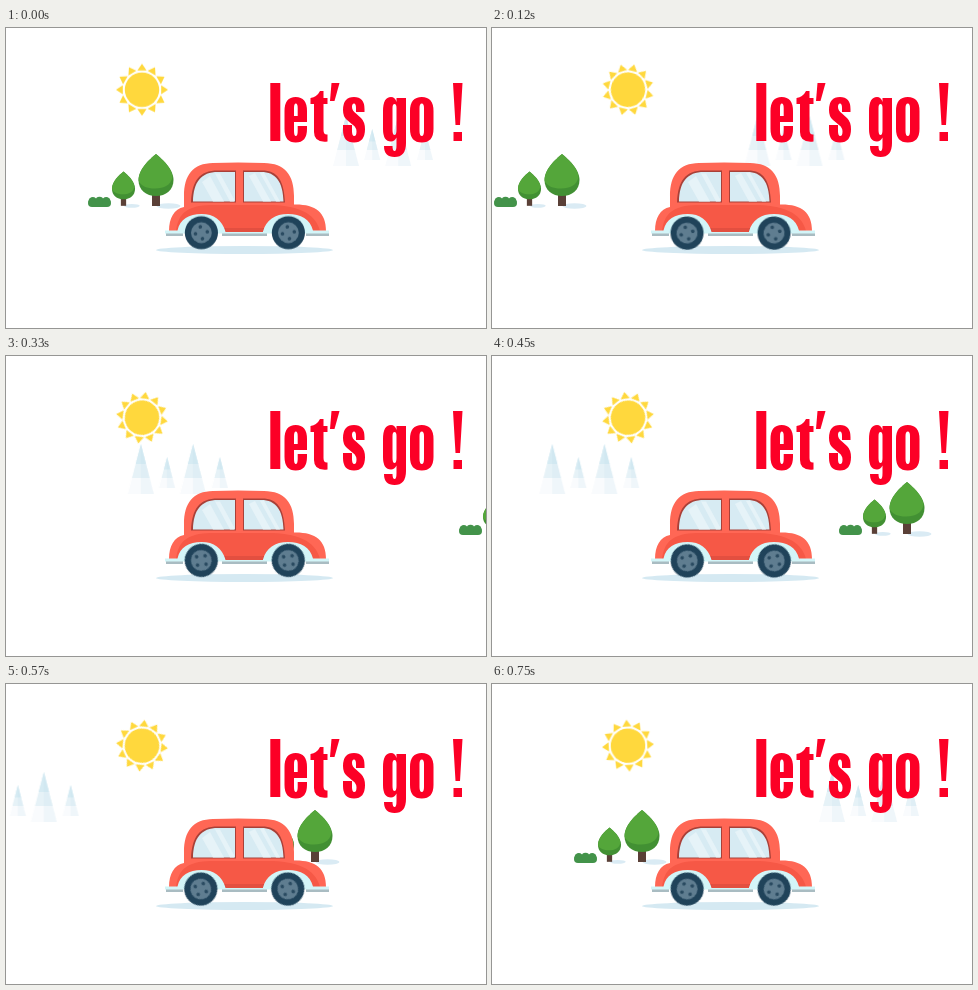
Animation, 480 px wide and 300 px high, one loop 0.78 s. Source, as an HTML page:

```html
<!DOCTYPE html>
<html lang="en">
<head>
<meta charset="utf-8">
<title>Road trip</title>
<style>
  html, body { margin: 0; width: 100%; height: 100%; overflow: hidden; background: #fff; }
  svg { display: block; width: 480px; height: 300px; }
</style>
</head>
<body>
<svg viewBox="0 0 480 300">
  <defs>
    <g id="peak">
      <path d="M0 0L13 50H-13Z" fill="#f9fbfd"/>
      <path d="M0 0L8.8 34H-8.8Z" fill="#e6f2f7"/>
      <path d="M0 0L5.2 20H-5.2Z" fill="#d6ebf3"/>
      <path d="M0 0L13 50H0Z" fill="#b4d6e4" opacity=".13"/>
    </g>
    <g id="tree">
      <ellipse cx="12.5" cy="52" rx="12" ry="2.8" fill="#daebf4"/>
      <path d="M-4 38H4V52H-4Z" fill="#5a4037"/>
      <path d="M0 0C6 5 17.5 15 17.5 26C17.5 36 10 42 0 42C-10 42 -17.5 36 -17.5 26C-17.5 15 -6 5 0 0Z" fill="#429033"/>
      <path d="M0 0C6 5 16 14 16.5 23C15 31 8 34.5 -1 34.5C-9 34.5 -15 32 -17.4 27C-18 15 -6 5 0 0Z" fill="#54a63a"/>
    </g>
    <g id="wheel">
      <circle cx=".4" r="16.6" fill="#20435a"/>
      <circle cx=".4" r="10.4" fill="#5f7d90"/>
      <g id="bolts" fill="#294a60"></g>
    </g>
  </defs>

  <g id="peaks">
    <use href="#peak" x="340" y="88"/>
    <use href="#peak" transform="translate(366.2 101) scale(.62)"/>
    <use href="#peak" x="392.2" y="88"/>
    <use href="#peak" transform="translate(419 101) scale(.62)"/>
  </g>

  <g transform="translate(136 61.7)">
    <g id="sun" fill="#ffd83d"><circle r="17.2"/></g>
  </g>

  <g id="trees">
    <g fill="#43934a">
      <rect x="82" y="171" width="23" height="8" rx="4"/>
      <circle cx="86.800" cy="173.200" r="4.200"/>
      <circle cx="93.500" cy="172.700" r="4"/>
      <circle cx="100.200" cy="173.200" r="4.200"/>
    </g>
    <use href="#tree" transform="translate(117.500 143.500) scale(.66)"/>
    <use href="#tree" x="150" y="126"/>
  </g>

  <ellipse cx="238.500" cy="222" rx="88.500" ry="4" fill="#d5e9f2"/>
  <g id="car">
    <path d="M178 179V168C178 147 187 135.300 207 135Q232 134 258 135C279 135.300 288 147 288 168V176.500C309 176 320 184 320 203H163C163 190 168 181 178 179Z" fill="#ff6755"/>
    <path d="M170 203C172 185 182 177.500 204 177H262C290 177 309 184 314 203Z" fill="#f65846"/>
    <path d="M214 200H265V204H214Z" fill="#d8483b"/>
    <path d="M185 174.500C186 153 193 142.500 212 142.500H230V174.500ZM237 174.500V142.500H256C272 142.500 278 153 279 174.500Z" fill="#a94038"/>
    <path d="M187 173.500C187.500 154 195 144 212 144H229V173.500ZM238 173.500V144H255C270 144 277 154 277.500 173.500Z" fill="#d7ebf3"/>
    <path d="M196 154L204 148L218 173.500H207ZM209 145.500H214L228 171V173.500H224ZM243 148L249 145L265 173.500H257ZM254 145L258 144.500L274 173.500H270Z" fill="#e6f3f8"/>
    <path d="M159 202.500H171.500C174 191 183 186 195.500 186C208 186 216 192 219.500 203.500H257C260 192 269 186 282 186C295 186 304 191 307 202.500H323V205.500H159Z" fill="#d3f5f8"/>
    <path d="M219.500 200H257V204H219.500Z" fill="#e34f40"/>
    <path d="M160 205H177V208H160ZM216 205H261V208H216ZM300 205H323V208H300Z" fill="#a9bcc2"/>
    <path d="M160 204H177V205.500H160ZM216 204H261V205.500H216ZM300 204H323V205.500H300Z" fill="#d3f5f8"/>
  </g>
  <g transform="translate(195 204.700)"><g class="spin"><use href="#wheel"/></g></g>
  <g transform="translate(282 204.700)"><g class="spin"><use href="#wheel"/></g></g>

  <!-- Condensed poster lettering -->
  <g role="img" aria-label="let's go !" fill="#fc0026" fill-rule="evenodd">
    <path d="M264.300 55H274.300V113H264.300Z"/>
    <path d="M278.500 83Q278.500 69 289.700 69Q301 69 301 83V94H288V103Q288 108 289.800 108Q291.700 108 291.700 103V98H301V101Q301 114.500 289.700 114.500Q278.500 114.500 278.500 101ZM288 88H291.700V80Q291.700 75.500 289.800 75.500Q288 75.500 288 80Z"/>
    <path d="M317.500 63V70H321.500V76H317.500V102Q317.500 107 321.500 106.500V113.500Q308 115 308 104V76H304.500V70Q311 69 314 63Z"/>
    <path d="M325.500 55H333.500L328.500 73H324Z"/>
    <path d="M358.500 84H350V80Q350 75.500 348 75.500Q346 75.500 346 79Q346 82.500 350 85.500L355 90Q359 94 359 101Q359 114.500 348 114.500Q337 114.500 337 102V97H346V103Q346 108 348.200 108Q350.500 108 350.500 103.500Q350.500 99.500 347 97L341 92Q337 89 337 82Q337 69 348 69Q358.500 69 358.500 81Z"/>
    <path d="M390.500 70H400V115Q400 129 388.500 129Q378 129 378 118H386.500Q386.500 123 388.600 123Q390.500 123 390.500 117V109.500Q388.500 113.500 385 113.500Q377 113.500 377 101V83Q377 69 385 69Q389 69 390.500 74ZM386.500 80V102Q386.500 107 388.500 107Q390.500 107 390.500 102V80Q390.500 76 388.500 76Q386.500 76 386.500 80Z"/>
    <path d="M404 83Q404 69 415.800 69Q427.500 69 427.500 83V101Q427.500 114.500 415.800 114.500Q404 114.500 404 101ZM413.500 80V103Q413.500 108 415.800 108Q418 108 418 103V80Q418 75.500 415.800 75.500Q413.500 75.500 413.500 80Z"/>
    <path d="M447 55H456.500L454 97H449.500ZM447.500 104H456V113H447.500Z"/>
  </g>
</svg>
<script>
  const LOOP = 780, STEPS = 26;
  const $ = id => document.getElementById(id);

  function add(parent, tag, attrs) {
    const el = document.createElementNS(parent.namespaceURI, tag);
    for (const key in attrs) el.setAttribute(key, attrs[key]);
    parent.append(el);
  }

  for (let i = 0; i < 12; i++)
    add($('sun'), 'path', { d: 'M0 -26L4.6 -19.2H-4.6Z', transform: `rotate(${i * 30})` });
  for (let i = 0; i < 4; i++)
    add($('bolts'), 'circle', { cx: .4, cy: -6, r: 1.8, transform: `rotate(${i * 90 - 10} .4 0)` });

  // Keys are [step, transform]; the whole loop advances in equal ticks.
  function play(el, keys) {
    const frames = keys.map(([step, transform]) => ({ offset: step / STEPS, transform }));
    el.animate(frames, { duration: LOOP, delay: -1, iterations: Infinity, easing: `steps(${STEPS}, end)` });
  }
  const turn = deg => [[0, 'rotate(0deg)'], [STEPS, `rotate(${deg}deg)`]];
  const slide = (...keys) => keys.map(([step, x]) => [step, `translate(${x}px, 0px)`]);

  play($('sun'), turn(90));
  document.querySelectorAll('.spin').forEach(el => play(el, turn(-1800)));

  // Both layers jump back while they are off the stage.
  const out = 9.5, last = 25, wrap = 24.5;
  play($('trees'), slide([0, 0], [out, -20 * out], [out, 26.5 * (last - out)], [last, 0], [STEPS, 0]));
  play($('peaks'), slide([0, 0], [wrap, -18.65 * wrap], [wrap, 0], [STEPS, 0]));
</script>
</body>
</html>
```
